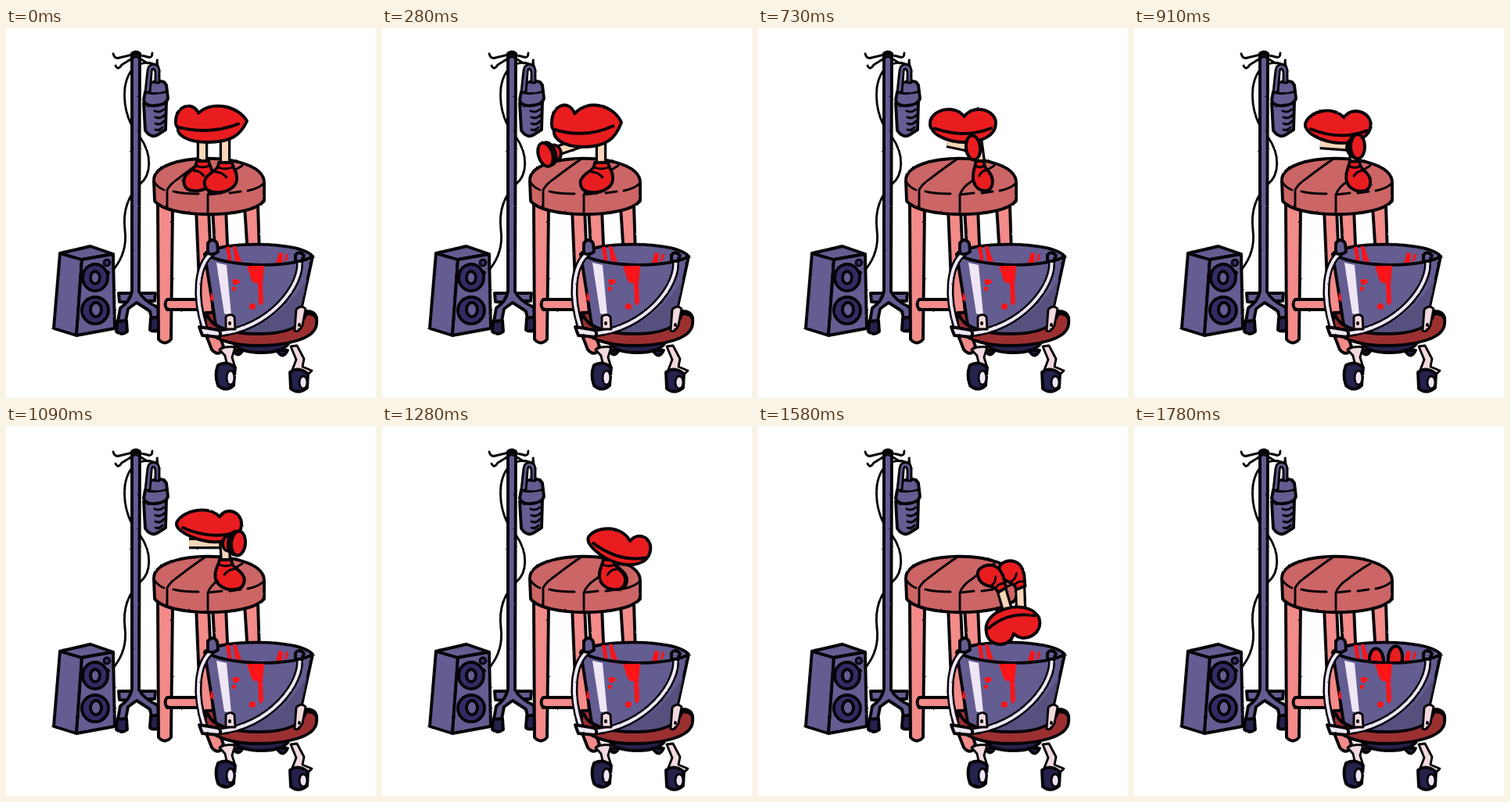
These frames come from a looping animation (473 px wide and 473 px high, 1880 ms). An HTML page:

```html
<!DOCTYPE html>
<html lang="en">
<head>
<meta charset="utf-8">
<title>Lips on a stool</title>
<style>
html, body { margin: 0; width: 100%; height: 100%; overflow: hidden; background: #fff; }
svg { display: block; width: 100vw; height: 100vh; }
.ink { stroke: #050307; stroke-width: 3.9; stroke-linecap: round; stroke-linejoin: round; fill: none; }
.steel { fill: #645d92; } .cone { fill: #322c66; } .navy { fill: #25224d; }
.seat { fill: #cc6565; } .wood { fill: #f28b89; } .tray { fill: #9c3031; }
.pale { fill: #efe6f5; } .clip { fill: #f3d9dd; } .red { fill: #e91d20; }
.blood { fill: #fb1418; stroke: none; }
.thin { stroke-width: 2.9; }
</style>
</head>
<body>
<svg viewBox="0 0 473 473">
<defs>
  <filter id="rough" filterUnits="userSpaceOnUse" x="0" y="0" width="473" height="473" color-interpolation-filters="sRGB">
    <feTurbulence type="fractalNoise" baseFrequency=".3" numOctaves="1" seed="4"/>
    <feDisplacementMap in="SourceGraphic" scale="2" xChannelSelector="R" yChannelSelector="G"/>
  </filter>
</defs>
<g class="ink" filter="url(#rough)">

  <!-- drip stand -->
  <path class="thin" d="M194 49C184 41 158 40 152 76C149 106 160 127 171 139C188 163 185 188 172 199C157 213 149 232 152 258C155 282 147 297 138 308"/>
  <path class="steel" d="M160 339L144 339L145 350L158 351ZM172 339L191 339L190 349L174 349Z"/>
  <path class="steel" d="M161 33Q166 28 171 33L170 337Q176 349 194 357L195 371H186L184 362L167 351L156 359L153 375H143L146 358Q158 350 161 337Z"/>
  <path class="navy" d="M142 375L154 374L155 388Q148 394 141 388ZM185 371L196 369L197 384Q191 390 184 386Z"/>
  <path class="thin" d="M137 33Q139 40 145 38L166 33L181 37Q187 39 187 32M140 48Q143 55 148 47L166 36L181 45M161 32H171"/>
  <path class="steel" d="M176 96L178 131Q185 141 193 137L204 130L205 95Z"/>
  <path class="steel" d="M184 71Q193 66 202 69L205 73L207 90Q205 98 192 99Q178 101 176 92L178 82Z"/>
  <path class="steel thin" d="M178 82L181 54C182 44 195 44 196 54V70H191V57C190 50 186 51 186 58L184 82Z"/>
  <path class="thin" d="M194 49L193 41M178 82Q192 86 206 81M190 106Q196 109 202 104M191 114Q197 117 203 111M191 122Q197 125 202 119M191 130Q196 132 200 127"/>

  <!-- speaker -->
  <path class="steel" d="M69 288L97 296L90 393L61 384Z"/>
  <path class="steel" d="M69 288L108 279L137 289L97 296Z"/>
  <path class="steel" d="M97 296L137 289L139 384L90 393Z"/>
  <ellipse class="cone" cx="114" cy="319" rx="16" ry="17"/><ellipse class="steel" cx="114" cy="319" rx="6" ry="8"/>
  <ellipse class="cone" cx="114" cy="361" rx="17" ry="17"/><ellipse class="steel" cx="115" cy="360" rx="7" ry="9"/>
  <circle class="cone thin" cx="129" cy="300" r="4"/><circle cx="130" cy="313" r="1"/>

  <!-- stool -->
  <path class="wood" d="M264 230L281 230L284 300H268ZM305 228L322 225L324 290H309Z"/>
  <path class="wood" d="M243 230L259 230L265 370L279 410Q271 421 263 411L249 375Z"/>
  <path class="wood" d="M194 225L213 230L211 398Q203 407 195 398Z"/>
  <path class="wood" d="M206 347H249V360H206Q201 353 206 347Z"/>
  <path class="seat" d="M189 195C188 157 329 157 330 197V221C312 244 207 244 190 221Z"/>
  <path class="thin" d="M189 196Q194 204 202 207M214 209Q226 212 246 212M258 213L276 211M286 211L300 209M309 208Q324 205 330 198M206 231V207Q210 199 221 192Q239 178 254 168M258 237V213Q262 203 273 196Q288 184 302 176"/>

  <!-- bucket, inside -->
  <path class="steel" d="M254 289C268 273 375 271 392 292C377 308 275 307 254 289Z"/>
  <path class="blood" d="M281 280H286L289 300H284ZM290 279H294L301 299L293 298ZM349 287L354 288L353 300H345ZM358 288L361 290L359 298H356Z"/>

  <g id="actor"></g>

  <!-- bucket, outside -->
  <path class="navy" d="M290 402H362Q355 415 326 415Q298 415 290 402Z"/>
  <path class="navy" d="M291 412Q296 423 303 412ZM346 412Q354 425 360 412Z"/>
  <path class="tray" d="M255 364C248 389 278 406 320 406C372 406 399 389 397 370Q395 361 381 362Z"/>
  <path class="steel" d="M254 289C285 307 367 307 392 292L372 384C352 395 292 395 268 379Z"/>
  <path fill="#56507f" stroke="none" d="M385 320L371 383C350 393 310 393 285 388C330 384 360 360 385 320Z"/>
  <path class="pale" stroke="none" d="M269 300L282 303L288 367L279 365Z"/>
  <path class="blood" d="M308 304L330 304L328 328L329 350Q325 359 323 350L322 326Q314 328 312 316Z"/>
  <path class="blood" d="M289 322Q297 319 299 324Q297 329 291 328ZM289 331H294L293 336H289ZM262 338Q266 342 265 350L261 347Z"/>
  <circle class="blood" cx="315" cy="356" r="4"/>
  <path class="tray" d="M258 368C264 384 288 391 324 391C356 391 378 383 384 365Q399 365 397 378C396 398 358 406 320 406C278 405 252 393 255 372Z"/>
  <path d="M264 287C243 304 241 343 254 384M375 295C381 328 337 385 270 391" stroke-width="9"/>
  <path d="M264 287C243 304 241 343 254 384M375 295C381 328 337 385 270 391" stroke="#efe6f5" stroke-width="4"/>
  <path class="steel" d="M258 288V275Q264 267 270 275L271 286Q265 291 258 288Z"/>
  <path class="steel" d="M370 298V290Q375 284 381 291L378 298Z"/>
  <path class="pale" d="M247 382L271 386Q277 390 272 395L251 393Z"/>
  <path class="clip thin" d="M281 369Q287 364 292 369L293 385H281ZM371 360Q377 353 383 359L379 380Q374 390 369 387Z"/>
  <path d="M286 377v1M375 379v1"/>

  <!-- casters -->
  <path class="clip thin" d="M273 411Q281 406 293 408L289 421L293 434L284 437L280 419ZM364 407L372 406L381 423L379 433L391 438L386 443L366 437L371 424Z"/>
  <path class="navy" d="M271 431Q282 425 293 434L291 457Q281 466 271 457Q266 443 271 431ZM363 440Q374 432 386 442L385 460Q374 469 364 461Z"/>
  <ellipse class="pale thin" cx="287" cy="447" rx="5" ry="9"/>
  <ellipse class="pale thin" cx="380" cy="453" rx="5" ry="8"/>
</g>
</svg>
<script>
// at: step index; body: x, y, width, height, cleft position, cleft depth, angle
// near/far legs: hip x, y, foot x, y, facing, angle
const poses = [
  { at: 0, near: [280, 138, 280, 174, 1, 0], far: [251, 138, 251, 172, .9, 0], farFoot: shoe,
    body: [217, 101, 91, 45, .32, .17, 0] },
  { at: 1, near: [280, 138, 280, 174, 1, 0], far: [253, 142, 223, 172, 1, -35],
    body: [217, 101, 90, 48, .32, .17, 0] },
  { at: 3, near: [280, 142, 280, 174, 1, 0], far: [256, 146, 209, 162, 1, -18],
    body: [217, 100, 89, 52, .33, .18, 0] },
  { at: 6, near: [278, 140, 279, 174, 1, 0], far: [254, 146, 206, 155, 1, -6],
    body: [218, 100, 91, 49, .32, .17, 0] },
  { at: 8, near: [280, 142, 284, 172, -.6, 0], far: [242, 146, 275, 153, 0, -6],
    body: [220, 105, 84, 41, .52, .2, 0] },
  { at: 12, near: [279, 144, 281, 173, -.9, 0], far: [234, 150, 297, 150, -1, 5],
    body: [218, 109, 83, 39, .66, .17, 2] },
  { at: 13, near: [284, 148, 281, 173, -.9, 0], far: [248, 152, 306, 152, -1, 8],
    body: [230, 113, 83, 39, .64, .18, 9] },
  { at: 14, near: [294, 160, 290, 173, -.8, 0], far: [282, 160, 292, 173, -.8, 0], farFoot: shoe, behind: true,
    body: [262, 135, 81, 40, .65, .22, 14] },
  { at: 15, near: [306, 176, 299, 171, .9, 0], far: [306, 176, 301, 171, .8, 0], farFoot: shoe, behind: true,
    body: [290, 161, 79, 36, .66, .24, 12] },
  { at: 16, near: [322, 206, 303, 190, -.8, 70], far: [326, 200, 312, 181, -.8, 70], farFoot: shoe, behind: true,
    body: [296, 200, 74, 42, .55, .25, 75] },
  { at: 17, near: [318, 232, 311, 208, -.7, 150], far: [336, 232, 335, 205, -.7, 160], farFoot: shoe, behind: true,
    body: [290, 232, 70, 42, .52, .2, 165] },
  { at: 18, near: [315, 280, 312, 246, 0, 0], far: [336, 280, 337, 245, 0, 0], nearFoot: sole,
    body: [293, 264, 66, 40, .5, .2, 180] },
  { at: 19, near: [311, 330, 310, 300, 0, -4], far: [334, 330, 334, 297, 0, 4], nearFoot: sole,
    body: [293, 320, 66, 40, .5, .2, 180] }
];

const mix = (a, b, k) => a.map((v, i) => v + (b[i] - v) * k);
const place = (x, y, angle, inner) => `<g transform="translate(${x} ${y}) rotate(${angle})">${inner}</g>`;

function shoe([, , x, y, facing, angle]) {
  const px = v => v * facing;
  return place(x, y, angle,
    `<path class="red" d="M${px(-8)} -2C${px(-8)} 6 ${px(-14)} 8 ${px(-20)} 13C${px(-31)} 22 ${px(-27)} 36 ${px(-12)} 36
      C${px(0)} 37 ${px(14)} 31 ${px(15)} 20C${px(16)} 8 ${px(10)} 6 ${px(9)} -2Z"/>
     <path class="thin" d="M${px(-9)} 4Q${px(0)} 8 ${px(10)} 4M${px(-12)} 10Q${px(-4)} 10 ${px(2)} 17"/>`);
}

function sole([, , x, y, facing, angle]) {
  return place(x, y, angle,
    `<ellipse class="red" cx="${12 * facing}" cy="1" rx="8" ry="10"/>
     <ellipse class="red" cx="${4 * facing}" cy="0" rx="9" ry="15"/>
     <ellipse class="red" rx="9" ry="15.5"/>`);
}

function leg([x1, y1, x2, y2]) {
  const line = `x1="${x1}" y1="${y1}" x2="${x2}" y2="${y2}" stroke-linecap="butt"`;
  return `<line ${line} style="stroke-width:14.5"/><line ${line} style="stroke:#f6d5b8;stroke-width:8"/>`;
}

function lips([x, y, w, h, cleft, dip, angle]) {
  const p = (u, v) => `${((u - .5) * w).toFixed(1)} ${((v - .5) * h).toFixed(1)}`;
  const right = Math.max(0, .5 - cleft), left = Math.max(0, cleft - .5);
  const turn = cleft - .32;
  return place(x + w / 2, y + h / 2, angle,
    `<path class="red" d="M${p(0, .4)}C${p(left * .6, -.02)} ${p(cleft * .72, -.2)} ${p(cleft, dip)}
      C${p(cleft + (1 - cleft) * .28, -.2)} ${p(1 - right * .6, -.02)} ${p(1, .4)}
      C${p(1 - right * .5, .8)} ${p(.78, 1)} ${p(.45 + turn * .4, 1)}C${p(.16 + turn * .6, 1)} ${p(.02 + turn * .3, .8)} ${p(.03, .6)}Q${p(-.01, .5)} ${p(0, .4)}Z"/>
     <path d="M${p(.03 + turn * .2, .57)}Q${p(.47 + turn * .3, .8 + turn * .5)} ${p(.88 + turn * .25, .48 + turn * .4)}"/>`);
}

function drawActor(step) {
  const i = poses.findLastIndex(p => p.at <= step);
  const a = poses[i], b = poses[i + 1] || a;
  const k = b === a ? 0 : (step - a.at) / (b.at - a.at);
  const [near, far, body] = ["near", "far", "body"].map(part => mix(a[part], b[part], k));
  const farFoot = (a.farFoot || sole)(far), nearFoot = (a.nearFoot || shoe)(near);
  const legs = leg(far) + leg(near);
  return a.behind
    ? legs + farFoot + nearFoot + lips(body)
    : legs + lips(body) + nearFoot.repeat(a.at > 0) + farFoot + nearFoot.repeat(a.at === 0);
}

// 100 ms rest, twelve steps of 90 ms, then seven of 100 ms
function stepAt(t) {
  if (t < 100) return 0;
  if (t < 1180) return 1 + Math.floor((t - 100) / 90);
  return 13 + Math.floor((t - 1180) / 100);
}

const actor = document.getElementById("actor");
const start = performance.now();
let shown = -1;

function tick(now) {
  const step = stepAt(Math.max(0, now - start) % 1880);
  if (step !== shown) actor.innerHTML = drawActor(shown = step);
  requestAnimationFrame(tick);
}
tick(start);
</script>
</body>
</html>
```
